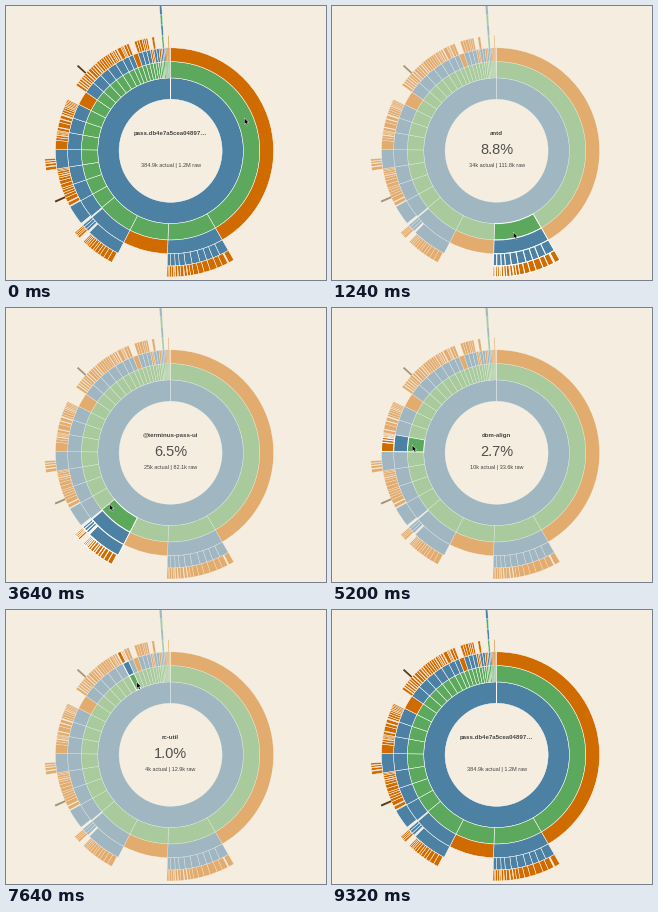
Write a matplotlib script that moves like this. It is 320 px wide and 274 px high and loops after 9.36 s.

```python
import math
import random

import matplotlib.pyplot as plt
import numpy as np
from matplotlib.animation import FuncAnimation
from matplotlib.collections import PatchCollection
from matplotlib.colors import to_rgb
from matplotlib.patches import Polygon, Wedge

W, H, DPI = 320, 274, 64
STEP, FRAMES = 40, 234
PT = 72 / DPI
CX, CY, UNIT = 164.6, 144.8, 51.5
RAW_TOTAL, RATIO = 1266, 3.287

BG = "#f5eee0"
BLUE, GREEN, ORANGE, DARK = "#4c81a3", "#5ca85c", "#d06b00", "#5a3a12"

rng = random.Random(4)


def radius(depth):
    return UNIT * math.sqrt(depth)


# Packages clockwise from the top: name and angle in degrees
PACKAGES = [
    ("lodash", 149.9), ("antd", 31.8), ("react-dom", 25.4),
    ("@terminus-pass-ui", 23.35), ("moment", 10.5), ("rc-table", 10.1),
    ("rc-tree", 9.9), ("core-js", 9.7), ("dom-align", 9.55),
    ("rc-select", 8.4), ("react-router", 8.25), ("immutable", 7.9),
    ("rc-calendar", 6.6), ("history", 5.9), ("rc-menu", 5.3),
    ("rc-trigger", 5.1), ("rc-form", 4.6), ("rc-util", 3.67),
    ("rc-tabs", 2.7), ("redux", 2.9), ("axios", 2.6), ("rc-animate", 2.4),
    ("react-redux", 2.1), ("qs", 1.9), ("rc-dialog", 1.6), ("warning", 1.4),
    ("fbjs", 1.1), ("rc-align", 0.9), ("babel-runtime", 1.0),
    ("process", 0.7), ("invariant", 0.6), ("classnames", 0.5),
    ("isarray", 0.45), ("shallowequal", 0.4), ("webpack", 0.35),
]

# Rings inside a package: depth, start and end share, pieces, colour
FULL = (3, 0, 1, 1, BLUE)
RINGS = {
    "lodash": [(3, 0, 1, 1, ORANGE)],
    "antd": [FULL, (4, 0, 1, 10, BLUE), (5, 0, 1, 18, ORANGE)],
    "react-dom": [(3, 0, 1, 1, ORANGE)],
    "@terminus-pass-ui": [(3, 0, .97, 1, BLUE), (4, 0, .76, 1, BLUE),
                          (5, .03, .72, 12, ORANGE), (4, .8, .97, 3, BLUE),
                          (5, .82, .96, 4, ORANGE)],
    "moment": [FULL, (4, .05, 1, 1, BLUE)],
    "rc-table": [FULL, (4, .05, 1, 6, ORANGE), (5, .48, .57, 1, DARK)],
    "rc-tree": [FULL, (4, 0, 1, 8, ORANGE)],
    "core-js": [FULL, (4, 0, 1, 1, BLUE), (5, 0, .55, 4, ORANGE)],
    "dom-align": [FULL, (4, 0, .48, 1, ORANGE), (4, .48, .74, 2, ORANGE),
                  (4, .78, 1, 4, ORANGE)],
    "rc-select": [FULL, (4, 0, .98, 4, ORANGE)],
    "react-router": [FULL, (4, 0, .95, 9, ORANGE)],
    "immutable": [(3, 0, 1, 1, ORANGE)],
    "rc-calendar": [FULL, (4, 0, 1, 5, ORANGE)],
    "history": [FULL, (4, 0, .97, 4, ORANGE), (5, .12, .26, 1, DARK)],
    "rc-menu": [FULL, (4, 0, 1, 4, ORANGE)],
    "rc-trigger": [FULL, (4, 0, .95, 4, ORANGE)],
    "rc-form": [FULL, (4, 0, .9, 4, ORANGE)],
    "rc-util": [FULL, (4, 0, .55, 1, ORANGE), (4, .6, .9, 2, ORANGE)],
    "rc-tabs": [FULL, (4, 0, 1, 2, ORANGE)],
    "redux": [(3, 0, 1, 1, ORANGE)],
    "axios": [FULL, (4, 0, 1, 2, ORANGE)],
    "rc-animate": [FULL, (4, 0, 1, 2, ORANGE)],
    "react-redux": [FULL, (4, 0, .9, 2, ORANGE)],
    "qs": [(3, 0, 1, 2, ORANGE)],
    "rc-dialog": [FULL, (4, 0, .8, 1, ORANGE)],
    "babel-runtime": [(d, 0, 1, 1, GREEN if d % 2 == 0 else BLUE)
                      for d in range(3, 9)],
    "shallowequal": [(3, 0, 1, 1, ORANGE), (4, 0, 1, 1, ORANGE)],
}


def split(a0, a1, n):
    """Cut an arc into n shrinking parts."""
    weights = [0.9 ** k * rng.uniform(0.75, 1.25) for k in range(n)]
    edges = a0 + (a1 - a0) * np.cumsum([0] + weights) / sum(weights)
    return list(zip(edges[:-1], edges[1:]))


def build():
    nodes = [(1, 0, 359.99, BLUE, "node_modules")]
    start = 0
    for i, (name, size) in enumerate(PACKAGES):
        nodes.append((2, start, start + size, GREEN, name))
        default = [(3, 0, 1, 1, BLUE if i % 2 else ORANGE)]
        for depth, lo, hi, n, color in RINGS.get(name, default):
            for a0, a1 in split(start + lo * size, start + hi * size, n):
                # leave slim gaps between the outermost files
                if depth >= 4 and n > 3 and color == ORANGE:
                    a1 -= (a1 - a0) * rng.choice([0, 0, 0, 0.2])
                nodes.append((depth, a0, a1, color, "index.js"))
        start += size
    return nodes


NODES = build()
DEPTH = np.array([n[0] for n in NODES])
START = np.array([n[1] for n in NODES])
END = np.array([n[2] for n in NODES])
RGB = np.array([to_rgb(n[3]) for n in NODES])


def stroke(node):
    depth, a0, a1, color, _ = node
    if color == DARK:
        return 0
    width = math.radians(a1 - a0) * radius(depth + 0.5)
    return PT * min(0.48, 0.3 * width)


STROKE = np.array([stroke(n) for n in NODES])

# Pointer keys: time, angle, distance from the centre
KEYS = np.array([
    (0, 67, 81), (1000, 148.5, 84), (1240, 168, 84.3), (1900, 183, 83),
    (2700, 208, 82), (3640, 229.0, 80), (4800, 262, 83), (5200, 274.5, 83.9),
    (6240, 295.1, 81.3), (7640, 335.2, 78.8), (8640, 345, 80),
])
EXIT_FROM, EXIT_TO, EXIT_START, EXIT_END = (144.1, 67.6), (306, 270), 8640, 9240


def pointer(t):
    if t > EXIT_END:
        return None
    if t > EXIT_START:
        k = (t - EXIT_START) / (EXIT_END - EXIT_START)
        return tuple(a + (b - a) * k for a, b in zip(EXIT_FROM, EXIT_TO))
    a = math.radians(np.interp(t, KEYS[:, 0], KEYS[:, 1]))
    r = np.interp(t, KEYS[:, 0], KEYS[:, 2])
    return CX + r * math.sin(a), CY - r * math.cos(a)


def hit(x, y):
    """Index of the arc under a point; the hole counts as the inner ring."""
    dx, dy = x - CX, y - CY
    depth = max(1, int((math.hypot(dx, dy) / UNIT) ** 2))
    angle = math.degrees(math.atan2(dx, -dy)) % 360
    found = np.flatnonzero((DEPTH == depth) & (START <= angle) & (angle < END))
    return found[0] if len(found) else None


fig = plt.figure(figsize=(W / DPI, H / DPI), dpi=DPI, facecolor=BG)
ax = fig.add_axes([0, 0, 1, 1])
ax.set_xlim(0, W)
ax.set_ylim(H, 0)
ax.axis("off")

arcs = PatchCollection(
    [Wedge((CX, CY), radius(d + 1), a0 - 90, a1 - 90,
           width=radius(d + 1) - radius(d)) for d, a0, a1, _, _ in NODES])
ax.add_collection(arcs)


def label(y, px, color, weight="normal"):
    return ax.text(CX, y, "", fontsize=px * PT, color=color, weight=weight,
                   family="Liberation Sans", ha="center", va="baseline")


title = label(129.2, 6.1, "#444444", "bold")
percent = label(148.4, 14.5, "#505050")
sizes = label(161.2, 5.5, "#444444")

ARROW = np.array([(0, 0), (0, 6.4), (1.5, 5.1), (2.6, 7.4), (3.7, 6.9),
                  (2.7, 4.7), (4.6, 4.6)]) - (0.8, 1.2)
cursor = Polygon(ARROW, facecolor="black", edgecolor="white",
                 linewidth=0.4 * PT, zorder=5)
ax.add_patch(cursor)


def draw(i):
    pos = pointer(i * STEP)
    cursor.set_visible(pos is not None)
    if pos:
        cursor.set_xy(ARROW + pos)
    node = hit(*pos) if pos and i else None

    alpha = np.ones(len(NODES))
    widths = STROKE
    if node is None:
        title.set_text("pass.db4e7a5cea04897…")
        percent.set_text("")
        sizes.set_text("384.9k actual | 1.2M raw")
    else:
        depth, a0, a1, _, name = NODES[node]
        inside = (DEPTH >= depth) & (START >= a0 - 1e-6) & (END <= a1 + 0.02)
        alpha[~inside] = 0.5
        # hovered arcs get a doubled outline
        widths = np.where(inside, 2 * STROKE, STROKE)
        share = (a1 - a0) / 360
        raw = share * RAW_TOTAL
        title.set_text(name)
        percent.set_text(f"{share * 100:.1f}%")
        if depth == 1:
            sizes.set_text("384.9k actual | 1.2M raw")
        else:
            sizes.set_text(f"{raw / RATIO:.0f}k actual | {raw:.1f}k raw")

    arcs.set_linewidth(widths)
    arcs.set_facecolor(np.column_stack([RGB, alpha]))
    arcs.set_edgecolor(np.column_stack([np.ones_like(RGB), alpha]))
    return arcs, title, percent, sizes, cursor


anim = FuncAnimation(fig, draw, frames=FRAMES, interval=STEP, repeat=True,
                     repeat_delay=0, blit=False)
plt.show()
```
